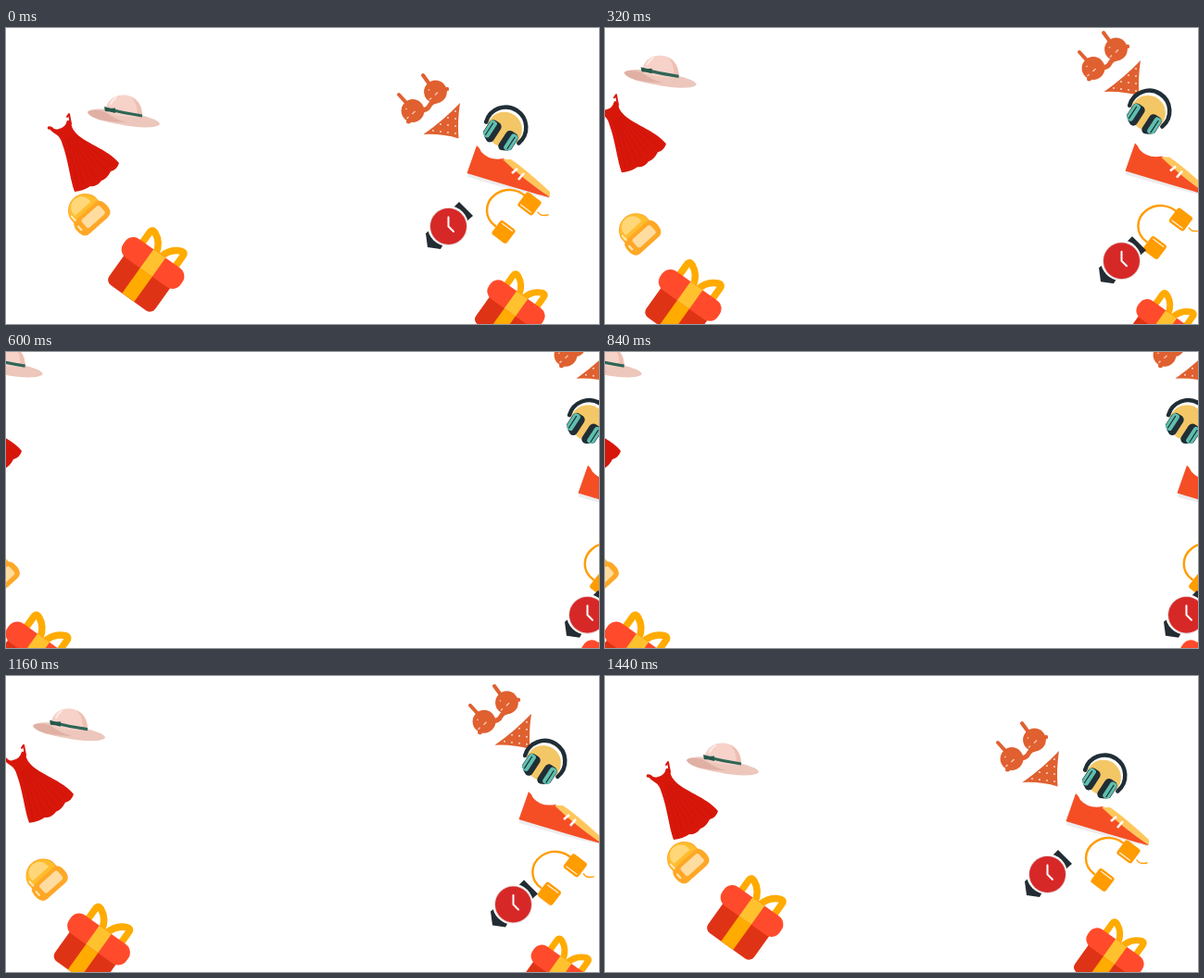
An HTML page with a canvas that plays this animation: 640 by 320 pixels, repeating every 1.88 s.

```html
<!DOCTYPE html>
<html lang="en">
<head>
<meta charset="utf-8">
<title>Shopping items</title>
<style>
html, body { margin: 0; width: 100%; height: 100%; overflow: hidden; background: #fff; }
canvas { display: block; width: 640px; height: 320px; }
</style>
</head>
<body>
<canvas id="stage" width="640" height="320"></canvas>
<script>
const ctx = document.getElementById('stage').getContext('2d');
const TICK = 40, LOOP = 1880, REACH = 16;

function fill(color, path) {
  ctx.fillStyle = color;
  ctx.fill(new Path2D(path));
}

function line(color, width, path, cap = 'round') {
  ctx.strokeStyle = color;
  ctx.lineWidth = width;
  ctx.lineCap = cap;
  ctx.lineJoin = 'round';
  ctx.stroke(new Path2D(path));
}

function disc(color, x, y, r) {
  ctx.fillStyle = color;
  ctx.beginPath();
  ctx.arc(x, y, r, 0, Math.PI * 2);
  ctx.fill();
}

function box(color, x, y, w, h, r) {
  ctx.fillStyle = color;
  ctx.beginPath();
  ctx.roundRect(x, y, w, h, r);
  ctx.fill();
}

function placed(x, y, degrees, scale, draw) {
  ctx.save();
  ctx.translate(x, y);
  ctx.rotate(degrees * Math.PI / 180);
  ctx.scale(scale, scale);
  draw();
  ctx.restore();
}

function hat() {
  fill('#edc7bc', 'M88 91C91 86 112 87 130 91C150 95 166 99 166 104C163 109 140 108 122 104C104 101 90 97 88 91Z');
  fill('#e0b0a4', 'M88 91C91 88 100 88 107 91C114 96 122 100 130 102C110 102 91 98 88 91Z');
  fill('#f7d2c9', 'M107 90C108 78 117 72 128 72.5C139 73 147 82 147 96C134 97 118 95 107 90Z');
  fill('#eebfb3', 'M135 74C143 78 147 85 147 95L142 95C142 86 140 79 135 74Z');
  line('#fdebe6', 2, 'M113 82Q115 78 119 75');
  line('#2f6656', 3.2, 'M107 87Q127 92 147 95', 'butt');
  fill('#24584a', 'M106 85L112 87L118 86.5L118 92L112 90.5L107 90Z');
}

function dress() {
  const red = '#d8170b';
  line(red, 2, 'M66 96L68 93L70 104');
  disc(red, 46.5, 108, 1.8);
  fill(red, 'M45 107L49 106.5Q53 111 57 109Q64 108 66 100L70 100Q70 108 75 113C84 124 110 131 122 146Q120 153 113 155Q109 163 103 165Q98 172 91 171Q84 176 74 177C69 163 67 142 61 126Q59 118 54 115Q49 112 45 107Z');
  for (let i = 0; i < 7; i++) {
    line('#c91308', 0.7, `M${65 + i * 1.6} ${121 - i}Q${73 + i * 3} ${142 - i * 2} ${78 + i * 6} ${173 - i * 4}`);
  }
}

function backpack() {
  placed(86, 198, -42, 1, () => {
    fill('#ffa726', 'M-18 -5A18.5 18.5 0 0 1 18 -5L18 1Q22 4 21 13Q20 21 13 21L-13 21Q-20 21 -21 13Q-22 4 -18 1Z');
    fill('#ffbd2e', 'M-17 -5A17.5 17.5 0 0 1 17 -5L17 0L-17 0Z');
    fill('#ffd778', 'M-12 -4L-12 -6A11.5 11.5 0 0 1 11 -6L11 -4Z');
    line('#ffe9b5', 2, 'M-15 0L-15 -6M-17 7L-17 12');
    box('#ffdda0', -11, 4, 26, 12, 3);
  });
}

function gift(x, y, scale) {
  placed(x, y, 35.5, scale, () => {
    for (const side of [-1, 1]) {
      ctx.save();
      ctx.scale(side, 1);
      line('#ffab00', 7.5, 'M22 -9L22 -25Q22 -30 17 -28Q6 -23 3 -10');
      ctx.restore();
    }
    box('#df3316', -30, 4, 61, 42, 7);
    box('#ffab00', -8, 8, 16, 38, 0);
    box('#ff4b2b', -38, -12.5, 76, 25, 11);
    box('#ffc22e', -8, -12.5, 16, 25, 0);
  });
}

function bikini() {
  const orange = '#e06030';
  line(orange, 4, 'M424 72L434 83M450 51L458 62');
  line(orange, 5, 'M447 89Q455 89 457 84Q459 80 464 79');
  for (const [x, y] of [[439, 89.5], [463.5, 69]]) {
    disc(orange, x, y, 12.4);
    for (let i = 0; i < 6; i++) {
      disc('#f8dccd', x - 7 + i * 7 % 13, y - 2 + i * 5 % 11, 0.8);
    }
  }
  disc(orange, 434.5, 101, 2.5);
  disc(orange, 476, 66, 2.2);
  fill(orange, 'M450.5 115Q472 100 490 81Q487 101 488.5 119.5Q471 114 450.5 115Z');
  for (let row = 0; row < 4; row++) {
    for (let i = 0; i <= row; i++) {
      disc('#f9e4d9', 485 - i * 8, 90 + row * 8 - i, 0.9);
    }
  }
}

function headphones() {
  placed(539, 108, 33, 1, () => {
    disc('#fff', 0, 0, 22);
    disc('#f3c766', 0, 2, 19);
    line('#202e36', 4.5, 'M-21 6A22 22 0 1 1 21 6');
    ctx.beginPath();
    ctx.arc(0, 0, 24.5, 0, Math.PI * 2);
    ctx.clip();
    for (const side of [-1, 1]) {
      ctx.save();
      ctx.scale(side, 1);
      box('#202e36', 3.5, -1, 14.5, 24, 5);
      box('#5fbfae', 9.5, 0, 8, 20, 3);
      line('#202e36', 1.2, 'M14 3L14 18');
      ctx.restore();
    }
  });
}

function sneaker() {
  fill('#ececee', 'M498 156L586 179L586 184Q570 182 498 161Z');
  fill('#f54e25', 'M508 127Q511 129 513 134Q522 144 537 141L586 178L586 183Q570 179 497.5 157Z');
  fill('#ffc65c', 'M536 142L545 142Q560 152 587 177L587 183Q560 165 536 142Z');
  line('#fff', 2.6, 'M546 157L552 152M553 164L559 157', 'butt');
}

function earphones() {
  const amber = '#ff9c00';
  line(amber, 2.4, 'M528 214C516 205 516 189 528 180C539 172 553 174 562 183');
  line(amber, 1.4, 'M574 199Q577 204 585 202');
  for (const [x, y, side] of [[565, 190, 1], [537, 220.5, -1]]) {
    placed(x, y, 37, 1, () => {
      box(amber, -10, -9.5, 20, 19, 3);
      line('#fff', 1, `M-7 ${side * 6.5}L7 ${side * 6.5}`);
    });
  }
}

function watch() {
  fill('#232c32', 'M483 194L489 188L504 203L496 210Z');
  fill('#232c32', 'M453 222L458 218L473 232L469 239L455 237Z');
  disc('#fff', 477, 214, 22);
  disc('#e5d9d9', 477.5, 214.5, 20.5);
  disc('#d72828', 477.5, 214.5, 19.5);
  line('#fff', 2, 'M477.5 204.5L477.5 214.5L483 220');
}

// Each item drifts outward by [dx, dy] per tick.
const items = [
  [hat, -8.42, -5.33],
  [dress, -7, -2.6],
  [backpack, -6.5, 2.65],
  [() => gift(158.5, 254, 1), -8.35, 4.36],
  [bikini, 11, -5.75],
  [sneaker, 8, -0.3],
  [headphones, 6, -2.23],
  [earphones, 7.05, 2.13],
  [() => gift(550.5, 298, 0.92), 6.75, 2.6],
  [watch, 10, 4.65]
];

function render(now) {
  const tick = Math.floor((now % LOOP) / TICK);
  const step = Math.max(0, Math.min(REACH, tick, 36 - tick));
  ctx.fillStyle = '#fff';
  ctx.fillRect(0, 0, 640, 320);
  for (const [draw, dx, dy] of items) {
    placed(dx * step, dy * step, 0, 1, draw);
  }
}

const start = performance.now();
function frame() {
  render(performance.now() - start);
  requestAnimationFrame(frame);
}
frame();
</script>
</body>
</html>
```
